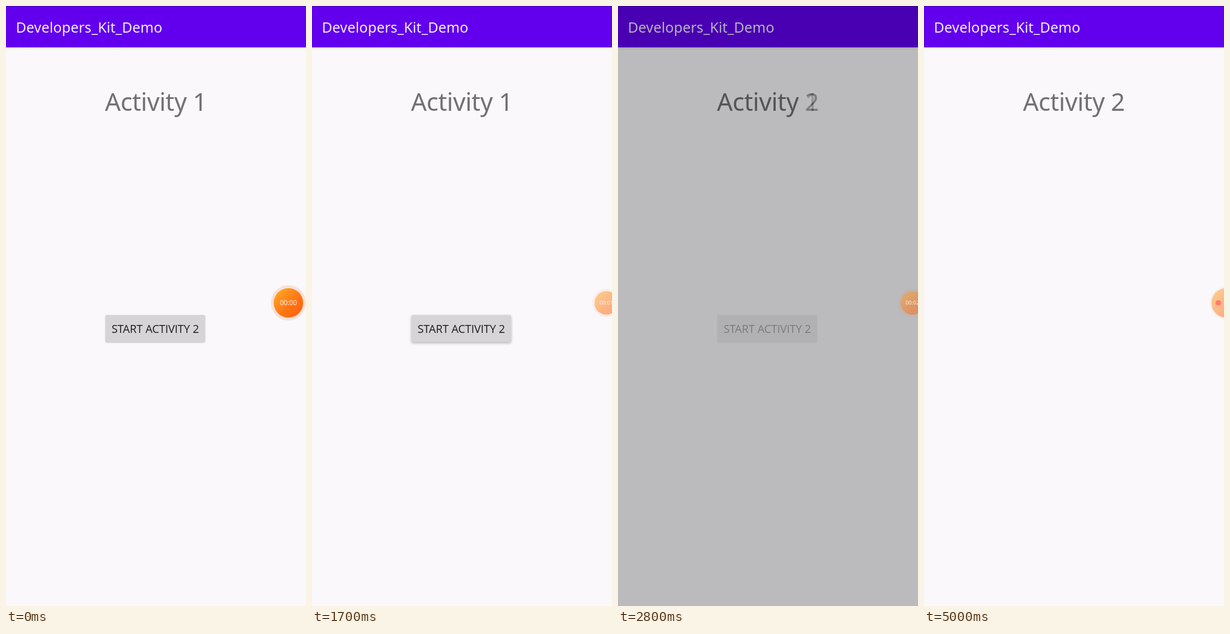
An HTML page with a canvas that plays this animation: 529x1059 px, repeating every 7200 ms.

```html
<!DOCTYPE html>
<html lang="en">
<head>
<meta charset="utf-8">
<title>Activity transition</title>
<style>
  html, body { margin: 0; width: 100%; height: 100%; overflow: hidden; background: #faf8fb; }
  canvas { display: block; }
</style>
</head>
<body>
<canvas id="stage"></canvas>
<script>
const W = 529, H = 1059, LOOP = 7200, STEP = 100;
const SANS = '"Noto Sans", sans-serif';
const BTN = { x: 175.5, y: 545.5, w: 175.5, h: 47.5 };

const stage = document.getElementById('stage');
stage.width = W;
stage.height = H;
const ctx = stage.getContext('2d');

const layer = document.createElement('canvas');
layer.width = W;
layer.height = H;
const page = layer.getContext('2d');

const clamp = v => Math.min(1, Math.max(0, v));
const ramp = (t, from, to) => clamp((t - from) / (to - from));
const mix = (a, b, k) => a + (b - a) * k;

function text(c, str, x, y, font, color, align = 'left', spacing = 0) {
  c.font = font;
  c.fillStyle = color;
  c.textAlign = align;
  c.textBaseline = 'alphabetic';
  c.letterSpacing = spacing + 'px';
  c.fillText(str, x, y);
}

function disc(c, x, y, r, fill) {
  c.fillStyle = fill;
  c.beginPath();
  c.arc(x, y, r, 0, Math.PI * 2);
  c.fill();
}

function drawButton(c, t) {
  const lift = ramp(t, 900, 1350) * (1 - ramp(t, 1900, 2400));
  c.beginPath();
  c.roundRect(BTN.x, BTN.y, BTN.w, BTN.h, 2);
  c.save();
  c.shadowColor = `rgba(0,0,0,${mix(0.24, 0.28, lift)})`;
  c.shadowOffsetY = mix(1, 2, lift);
  c.shadowBlur = mix(2.5, 5.5, lift);
  c.fillStyle = '#d6d4d7';
  c.fill();
  c.restore();

  const press = 1 - ramp(t, 1500, 1700);
  if (t >= 1000 && press > 0) {
    c.save();
    c.clip();
    const r = 72 + (t - 1200) * 0.36;
    disc(c, mix(313, 263, ramp(t, 1200, 1400)), 556, Math.max(0, r), `rgba(0,0,0,${0.065 * press})`);
    c.restore();
  }
  text(c, 'START ACTIVITY 2', BTN.x + BTN.w / 2, 576.5, '19.5px "Open Sans", sans-serif', '#1d1c1e', 'center', -0.1);
}

function drawPage(c, number, t) {
  c.fillStyle = '#faf8fb';
  c.fillRect(0, 0, W, H);

  c.save();
  c.shadowColor = 'rgba(0,0,0,.16)';
  c.shadowOffsetY = 1;
  c.shadowBlur = 4;
  c.fillStyle = '#6200ee';
  c.fillRect(-10, -10, W + 20, 83);
  c.restore();
  c.fillStyle = '#3f00ae';
  c.fillRect(0, 0, W, 1);

  text(c, 'Developers_Kit_Demo', 17.5, 46.5, '25px ' + SANS, '#f4eeff', 'left', 0.12);
  text(c, 'Activity ' + number, 174.5, 184.5, '350 43.5px ' + SANS, '#717073', 'left', -0.35);
  if (number === 1) drawButton(c, t);
}

function blend(number, t, alpha) {
  drawPage(page, number, t);
  ctx.globalAlpha = alpha;
  ctx.drawImage(layer, 0, 0);
  ctx.globalAlpha = 1;
}

function orange(x, y, r) {
  const g = ctx.createLinearGradient(x - r * 0.7, y - r * 0.7, x + r * 0.7, y + r * 0.7);
  g.addColorStop(0, '#ff9f24');
  g.addColorStop(0.65, '#ff7212');
  g.addColorStop(1, '#ff6610');
  return g;
}

function drawBubble(t) {
  const y = 524;
  ctx.save();
  if (t >= 5000) {
    ctx.globalAlpha = 0.48;
    disc(ctx, 533, y, 28.5, 'rgba(240,130,80,.2)');
    disc(ctx, 533, y, 26, orange(533, y, 26));
    ctx.globalAlpha = 1;
    disc(ctx, 519, y, 4.8, '#ff7a6e');
  } else {
    const u = t < 900 ? 0 : ramp(t, 830, 1300);
    const k = 1 - (1 - u) ** 2;
    const secs = [1000, 2400, 3400, 4400].filter(tick => t >= tick).length;
    ctx.translate(mix(498, 519, k), y);
    ctx.scale(mix(1, 0.8, k), mix(1, 0.8, k));
    ctx.globalAlpha = mix(1, 0.48, k);
    disc(ctx, 0, 0, 31, 'rgba(240,130,80,.2)');
    disc(ctx, 0, 0, 26, orange(0, 0, 26));
    ctx.globalAlpha = mix(0.88, 0.8, k);
    text(ctx, '00:0' + secs, 0, 4.2, '11.8px ' + SANS, '#fff', 'center');
  }
  ctx.restore();
}

function render(t) {
  // Both pages fade over black, which dims the middle of the change.
  const a = (1 - Math.cos(Math.PI * ramp(t, 1844, 3855))) / 2;
  ctx.fillStyle = '#000';
  ctx.fillRect(0, 0, W, H);
  if (a < 1) blend(1, t, 1 - a);
  if (a > 0) blend(2, t, a);
  drawBubble(t);
}

const start = performance.now();
function tick() {
  const t = (performance.now() - start) % LOOP;
  render(Math.floor(t / STEP) * STEP);
  requestAnimationFrame(tick);
}
tick();
</script>
</body>
</html>
```
